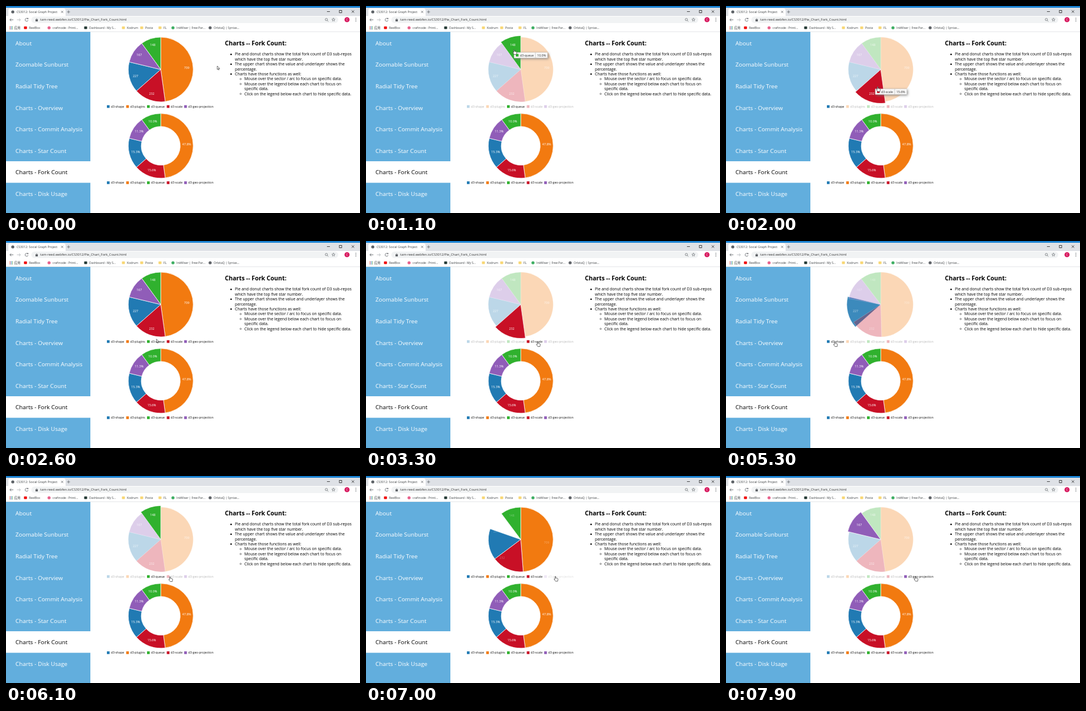
An HTML page with a canvas for the animation above (8 s loop, 600 by 352 pixels).

```html
<!DOCTYPE html>
<html lang="en">
<head>
<meta charset="utf-8">
<title>Charts - Fork Count</title>
<style>
html, body { margin: 0; width: 100%; height: 100%; overflow: hidden; background: #fff; }
canvas { display: block; width: 600px; height: 352px; }
</style>
</head>
<body>
<canvas id="stage" width="600" height="352"></canvas>
<script>
const ctx = document.getElementById('stage').getContext('2d');
const LOOP = 8000, STEP = 100, TAU = Math.PI * 2;
const FONT = '"Open Sans", "Noto Sans", "Noto Sans CJK SC", sans-serif';
const RADIUS = 55, EXPANDED = 57.6, FADED = 0.3;

// Legend order; x is the left edge of the legend tile.
const series = [
  { id: 'shape', value: 227, color: '#217ab3', x: 171 },
  { id: 'plugins', value: 709, color: '#f27a10', x: 203.7 },
  { id: 'queue', value: 148, color: '#30b12e', x: 239 },
  { id: 'scale', value: 232, color: '#c81026', x: 272.5 },
  { id: 'geo-projection', value: 167, color: '#905db8', x: 302 }
];
const total = series.reduce((sum, s) => sum + s.value, 0);
const percent = s => (s.value / total * 100).toFixed(1) + '%';

const cursorPath = [
  [0, 358, 102], [200, 350, 99], [500, 312, 88], [800, 264, 75], [1000, 252, 74],
  [1200, 250, 74], [1400, 236, 84], [1600, 222, 110], [1800, 238, 131], [1900, 254, 136],
  [2000, 257, 137], [2300, 258, 160], [2700, 254, 169], [3000, 268, 171], [3300, 291, 171],
  [3600, 318, 171], [3900, 286, 171], [4200, 220, 171], [4500, 184.5, 171], [5400, 184.5, 171],
  [5800, 232, 171], [6100, 278, 171], [6300, 290, 171], [6600, 321, 170.5], [8000, 321, 170.5]
];
const focusChanges = [
  [0, null], [450, 'plugins'], [900, 'queue'], [1350, 'geo-projection'], [1550, 'shape'],
  [1900, 'scale'], [2350, null], [2750, 'queue'], [3050, 'scale'], [3450, 'geo-projection'],
  [3750, 'scale'], [3950, 'queue'], [4150, 'plugins'], [4400, 'shape'], [4620, null],
  [5080, 'shape'], [5550, 'plugins'], [5850, 'queue'], [6250, 'scale'],
  [6400, 'geo-projection'], [6880, null], [7550, 'geo-projection']
];
const toggles = [
  { id: 'shape', hide: 4620, show: 5080 },
  { id: 'geo-projection', hide: 6880, show: 7550 }
];

const clamp = v => Math.max(0, Math.min(1, v));
const lerp = (a, b, p) => a + (b - a) * p;
const ease = p => p < 0.5 ? 4 * p ** 3 : 1 - (2 - 2 * p) ** 3 / 2;

function cursorAt(t) {
  const i = Math.max(1, cursorPath.findIndex(k => k[0] > t));
  const [a, b] = [cursorPath[i - 1], cursorPath[i]];
  const p = clamp((t - a[0]) / (b[0] - a[0]));
  return { x: lerp(a[1], b[1], p), y: lerp(a[2], b[2], p) };
}

function focusAt(t) {
  return focusChanges.reduce((id, [time, next]) => time <= t ? next : id, null);
}

function text(str, x, midY, size, color = '#000', align = 'left', weight = 400) {
  ctx.font = `${weight} ${size}px ${FONT}`;
  ctx.fillStyle = color;
  ctx.textAlign = align;
  ctx.fillText(str, x, midY + size * 0.36);
}

function rect(x, y, w, h, color) {
  ctx.fillStyle = color;
  ctx.fillRect(x, y, w, h);
}

function pill(x, y, w, h, radii, color) {
  ctx.beginPath();
  ctx.roundRect(x, y, w, h, radii);
  ctx.fillStyle = color;
  ctx.fill();
}

function disc(x, y, r, color) {
  ctx.beginPath();
  ctx.arc(x, y, r, 0, TAU);
  ctx.fillStyle = color;
  ctx.fill();
}

function line(points, color = '#5f6368', width = 0.8) {
  ctx.beginPath();
  points.forEach(([x, y]) => ctx.lineTo(x, y));
  ctx.strokeStyle = color;
  ctx.lineWidth = width;
  ctx.stroke();
}

function ring(x, y, r, color = '#5f6368', width = 0.8, start = 0, end = TAU) {
  ctx.beginPath();
  ctx.arc(x, y, r, start, end);
  ctx.strokeStyle = color;
  ctx.lineWidth = width;
  ctx.stroke();
}

function drawTabs() {
  rect(0, 0, 600, 17, '#dee1e6');
  rect(0, 0, 600, 3, '#1c83d3');
  pill(4, 4, 97, 14, [4, 4, 0, 0], '#fff');
  disc(11.5, 10, 2.6, '#5f6368');
  text('CS3012: Social Graph Project', 18, 10, 5.2, '#3c4043');
  line([[93.5, 8.2], [97, 11.8]]);
  line([[97, 8.2], [93.5, 11.8]]);
  line([[103.5, 10], [108.5, 10]]);
  line([[106, 7.5], [106, 12.5]]);
  line([[544, 9.5], [549, 9.5]], '#222');
  ctx.strokeRect(565, 7.5, 4, 4);
  line([[586, 7.5], [590, 11.5]], '#222');
  line([[590, 7.5], [586, 11.5]], '#222');
}

function drawToolbar() {
  rect(0, 17, 600, 27, '#fff');
  line([[12.5, 23.5], [6.5, 23.5]]);
  line([[9, 21], [6.5, 23.5], [9, 26]]);
  line([[18.5, 23.5], [24.5, 23.5]], '#b5b8bc');
  line([[22, 21], [24.5, 23.5], [22, 26]], '#b5b8bc');
  ring(35, 23.5, 2.6, '#5f6368', 0.8, 0.3, 5.5);
  rect(36, 20.5, 1.8, 1.8, '#5f6368');

  pill(43, 18, 520, 11, 5.5, '#f1f3f4');
  rect(50, 23, 4, 3.2, '#5f6368');
  ring(52, 23, 1.3, '#5f6368', 0.7, Math.PI, TAU);
  text('tam-reed.webfen.io/CS3012/Pie_Chart_Fork_Count.html', 58, 23.3, 5.65, '#333');
  ring(543, 23, 2, '#5f6368', 0.7);
  line([[544.5, 24.5], [546.3, 26.3]]);
  const star = Array.from({ length: 11 }, (_, i) => {
    const r = i % 2 ? 1.3 : 3, a = i * TAU / 10;
    return [555 + r * Math.sin(a), 23.3 - r * Math.cos(a)];
  });
  line(star, '#5f6368', 0.6);
  disc(578, 23.3, 4.3, '#d81b60');
  text('C', 578, 23.3, 4.6, '#fff', 'center');
  [20.8, 23.3, 25.8].forEach(y => disc(593, y, 0.7, '#5f6368'));
}

function drawBookmarks() {
  for (let i = 0; i < 9; i++) {
    rect(6 + i % 3 * 2, 34.5 + Math.floor(i / 3) * 2, 1.3, 1.3, ['#e25b4a', '#4a8bdc', '#54a45c'][i % 3]);
  }
  text('应用', 14, 37, 5.3, '#3c4043');
  const folder = '#f8d775';
  const marks = [
    [39, 'ReelBox', '#f00000', 'square'], [79, 'craftnode - Printi...', '#e8618c', 'disc'],
    [141, 'Dashboard - My S...', '#253b36', 'square'], [205, 'Kodrum', folder, 'square'],
    [236, 'Posta', folder, 'square'], [267, 'FL', folder, 'square'],
    [289, 'InkWiser | Free Par...', '#3eae63', 'disc'], [352, 'OrbitaQ | Syntax...', '#5f6368', 'disc']
  ];
  for (const [x, label, color, kind] of marks) {
    if (kind === 'disc') disc(x - 6, 37, 2.6, color);
    else pill(x - 8.5, 34.8, 5, 4.4, 0.7, color);
    text(label, x, 37, 5, '#3c4043');
  }
  rect(0, 43.5, 600, 0.7, '#d8dadd');
}

function drawSidebar() {
  rect(0, 44, 143, 308, '#62aedd');
  const items = ['About', 'Zoomable Sunburst', 'Radial Tidy Tree', 'Charts - Overview',
    'Charts - Commit Analysis', 'Charts - Star Count', 'Charts - Fork Count', 'Charts - Disk Usage'];
  items.forEach((label, i) => {
    const active = i === 6;
    if (active) rect(0, 264, 143, 36.6, '#fff');
    text(label, 16, 63.2 + i * 36.6, 9.8, active ? '#000' : '#fff');
  });
}

function drawNotes() {
  text('Charts -- Fork Count:', 371, 63, 10.2, '#000', 'left', 700);
  const notes = [
    ['disc', 'Pie and donut charts show the total fork count of D3 sub-repos'],
    ['', 'which have the top five star number.'],
    ['disc', 'The upper chart shows the value and underlayer shows the'],
    ['', 'percentage.'],
    ['disc', 'Charts have those functions as well:'],
    ['ring', 'Mouse over the sector / arc to focus on specific data.'],
    ['ring', 'Mouse over the legend below each chart to focus on'],
    ['', 'specific data.'],
    ['ring', 'Click on the legend below each chart to hide specific data.']
  ];
  notes.forEach(([bullet, label], i) => {
    const x = i < 5 ? 388 : 404, y = 82 + i * 8.4;
    if (bullet === 'disc') disc(x - 6.5, y + 0.2, 1.3, '#000');
    if (bullet === 'ring') ring(x - 6.3, y + 0.2, 1.2, '#000', 0.5);
    text(label, x, y, 6.75);
  });
}

function layout(hiddenId) {
  const shown = series.filter(s => s.id !== hiddenId).sort((a, b) => b.value - a.value);
  const sum = shown.reduce((n, s) => n + s.value, 0);
  const arcs = {};
  let angle = 0;
  for (const s of shown) {
    const end = angle + s.value / sum * TAU;
    arcs[s.id] = [angle, end];
    angle = end;
  }
  return arcs;
}

function sector(cx, cy, [start, end], outer, inner, color) {
  const turn = Math.PI / 2;
  ctx.beginPath();
  if (inner) ctx.arc(cx, cy, inner, end - turn, start - turn, true);
  else ctx.moveTo(cx, cy);
  ctx.arc(cx, cy, outer, start - turn, end - turn);
  ctx.closePath();
  ctx.fillStyle = color;
  ctx.fill();
  ctx.strokeStyle = '#fff';
  ctx.lineWidth = 0.7;
  ctx.stroke();
}

function arcLabel(cx, cy, [start, end], label) {
  const mid = (start + end) / 2, r = RADIUS * 0.8;
  text(label, cx + r * Math.sin(mid), cy - r * Math.cos(mid), 5.3, '#fff', 'center');
}

function drawLegend(y, alphaOf) {
  for (const s of series) {
    ctx.globalAlpha = alphaOf(s);
    rect(s.x, y - 2.3, 4.6, 4.6, s.color);
    text('d3-' + s.id, s.x + 6.8, y, 5.2, '#111');
  }
  ctx.globalAlpha = 1;
}

function drawDonut() {
  const arcs = layout();
  for (const s of series) {
    sector(262.3, 237.8, arcs[s.id], RADIUS, 33, s.color);
    arcLabel(262.3, 237.8, arcs[s.id], percent(s));
  }
  drawLegend(300.5, () => 1);
}

function drawPie(t) {
  const cx = 262.3, cy = 108, focus = focusAt(t), legendFocus = focusAt(t - 150);
  const toggle = toggles.find(g => t >= g.hide && t < g.show + 400);
  const full = layout();
  const reduced = toggle ? layout(toggle.id) : full;
  const hidden = toggle && t < toggle.show;
  const progress = toggle ? clamp((t - (hidden ? toggle.hide : toggle.show)) / 350) : 1;
  const [from, to] = hidden ? [full, reduced] : [reduced, full];

  for (const s of series) {
    if (!to[s.id]) continue;
    const begin = from[s.id] || to[s.id];
    const arc = to[s.id].map((a, i) => lerp(begin[i], a, ease(progress)));
    const alpha = (focus && focus !== s.id ? FADED : 1) * (from[s.id] ? 1 : clamp(progress * 1.4));
    ctx.globalAlpha = alpha;
    sector(cx, cy, arc, focus === s.id ? EXPANDED : RADIUS, 0, s.color);
    ctx.globalAlpha = progress * (focus && focus !== s.id ? 0.75 : 1);
    arcLabel(cx, cy, to[s.id], s.value);
  }
  ctx.globalAlpha = 1;

  drawLegend(171, s => {
    if (hidden) return s.id === toggle.id ? 0.15 : 1;
    return legendFocus && legendFocus !== s.id ? FADED : 1;
  });
}

function drawTooltip(t) {
  const s = series.find(item => item.id === focusAt(t));
  if (!s || t > 2300) return;
  const at = cursorAt(t - 100), x = at.x - 1, y = at.y + 5, h = 9.3;
  const name = 'd3-' + s.id;
  ctx.font = `400 5.2px ${FONT}`;
  const nameWidth = ctx.measureText(name).width + 13;
  const width = nameWidth + ctx.measureText(percent(s)).width + 6;
  ctx.save();
  ctx.globalAlpha = 0.92;
  ctx.shadowColor = '#777';
  ctx.shadowBlur = 4;
  ctx.shadowOffsetX = ctx.shadowOffsetY = 1.5;
  rect(x, y, width, h, '#fff');
  ctx.restore();
  ctx.strokeStyle = '#ccc';
  ctx.lineWidth = 0.5;
  ctx.strokeRect(x, y, width, h);
  line([[x + nameWidth, y], [x + nameWidth, y + h]], '#aaa', 0.5);
  rect(x + 3, y + 2.4, 4.5, 4.5, s.color);
  text(name, x + 10, y + h / 2, 5.2, '#333');
  text(percent(s), x + width - 3, y + h / 2, 5.2, '#333', 'right');
}

const arrowShape = new Path2D('M0 0V6L1.4 4.8L2.3 6.8L3.2 6.4L2.3 4.4H4.2Z');
const handShape = new Path2D('M-.7 .5Q0-.5.7.5V3L3.5 3.6Q4.5 3.8 4.4 5L3.8 8.5H.3L-2.2 5.2Q-2.3 4.1-.7 5Z');

function drawCursor(t) {
  const { x, y } = cursorAt(t);
  const shape = t < 450 || (t >= 2350 && t < 2750) ? arrowShape : handShape;
  ctx.save();
  ctx.translate(x, y);
  ctx.fillStyle = '#fff';
  ctx.strokeStyle = '#222';
  ctx.lineWidth = 0.65;
  ctx.fill(shape);
  ctx.stroke(shape);
  ctx.restore();
}

function render(now) {
  const t = Math.floor(now % LOOP / STEP) * STEP;
  rect(0, 0, 600, 352, '#fff');
  drawTabs();
  drawToolbar();
  drawBookmarks();
  drawSidebar();
  drawNotes();
  drawPie(t);
  drawDonut();
  drawTooltip(t);
  drawCursor(t);
}

const startTime = performance.now();
function tick() {
  render(performance.now() - startTime);
  requestAnimationFrame(tick);
}
tick();
</script>
</body>
</html>
```
